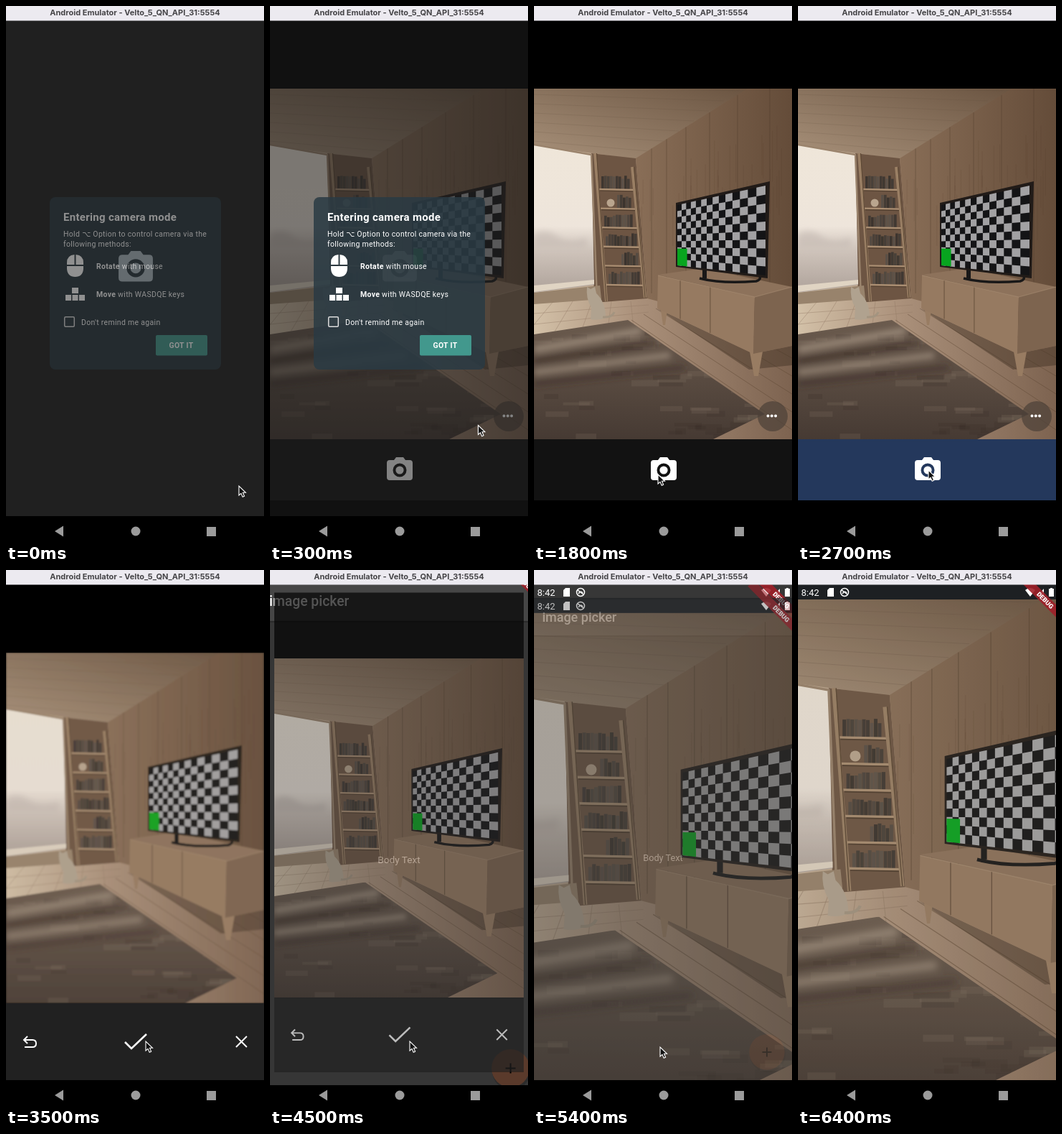
Animation of 360 by 746 pixels, one loop 7.2 s. Source, as an HTML page:

```html
<!DOCTYPE html>
<html>
<head>
<meta charset="utf-8">
<style>
html, body { margin: 0; width: 100%; height: 100%; overflow: hidden; background: #000; }
svg { display: block; width: 360px; height: 746px; }
text { font-family: Roboto, sans-serif; fill: #fff; }
.small { font-size: 10.5px; letter-spacing: .3px; }
.bold { font-weight: 700; }
.title { font: 700 11px Inter, sans-serif; fill: #464548; }
</style>
</head>
<body>
<svg viewBox="0 0 360 746" xmlns="http://www.w3.org/2000/svg">
<defs>
  <linearGradient id="ceil" x1="0" y1="1" x2="1" y2="0">
    <stop stop-color="#a8917a"/><stop offset="1" stop-color="#6a5441"/>
  </linearGradient>
  <linearGradient id="wall">
    <stop stop-color="#896e57"/><stop offset="1" stop-color="#644c39"/>
  </linearGradient>
  <linearGradient id="sky" x2="0" y2="1">
    <stop stop-color="#efe6d9"/><stop offset=".55" stop-color="#eee5db"/>
    <stop offset=".72" stop-color="#cec3ba"/><stop offset=".95" stop-color="#b3a79f"/>
  </linearGradient>
  <linearGradient id="floor">
    <stop stop-color="#d3c1a8"/><stop offset=".4" stop-color="#aa907a"/><stop offset="1" stop-color="#7d6350"/>
  </linearGradient>
  <linearGradient id="rug" x2="0" y2="1">
    <stop stop-color="#6b5b4e"/><stop offset="1" stop-color="#463a33"/>
  </linearGradient>
  <filter id="soft" x="-30%" y="-90%" width="160%" height="280%"><feGaussianBlur stdDeviation="4"/></filter>
  <filter id="blur"><feGaussianBlur id="focus" stdDeviation="1"/></filter>
  <clipPath id="view"><rect y="115" width="360" height="488"/></clipPath>
  <clipPath id="rugClip"><path d="M0 457L131 437L322 568L250 603H0Z"/></clipPath>
  <clipPath id="appClip"><rect y="20" width="360" height="697"/></clipPath>
  <clipPath id="pageClip"><rect y="20" width="360" height="690"/></clipPath>
  <g id="cam">
    <path d="M-14 -13H-8L-5 -17H5L8 -13H14Q18 -13 18 -9V11Q18 15 14 15H-14Q-18 15 -18 11V-9Q-18 -13 -14 -13ZM0 -8.5A9.5 9.5 0 1 0 0 10.5A9.5 9.5 0 1 0 0 -8.5Z" fill="#fff" fill-rule="evenodd"/>
    <circle cy="1" r="5.6" fill="#fff"/>
  </g>
  <g id="status">
    <text x="4.5" y="36" font-size="13">8:42</text>
    <circle cx="65" cy="31" r="5.5" fill="none" stroke="#fff" stroke-width="1.5"/>
    <path d="M61 28L69 34M62 33Q65 28 68 32" fill="none" stroke="#fff" stroke-width="1.5"/>
    <path d="M44 25H50V37H41V28ZM317 28Q324 22 331 28L324 37ZM343 26V36H334ZM350 26H352V25H355V26H357V37H350Z" fill="#fff"/>
    <g transform="translate(345 42) rotate(45)">
      <rect x="-60" y="-6.2" width="120" height="12.4" fill="#9f2029" opacity=".9"/>
      <text y="3.3" font-size="9" font-weight="900" text-anchor="middle">DEBUG</text>
    </g>
  </g>
  <g id="room" clip-path="url(#view)"></g>
</defs>

<rect width="360" height="746"/>
<g fill="#9b9b9b">
  <path d="M68 731L80 723.500V738.500Z"/><circle cx="181" cy="731" r="6.5"/><rect x="280" y="725" width="13" height="13"/>
</g>

<g id="app" clip-path="url(#appClip)"><g id="appBody">
  <rect y="20" width="360" height="690" fill="#363636"/>
  <rect y="20" width="360" height="73" fill="#2b2b2b"/>
  <rect y="20" width="360" height="71" fill="#464646"/>
  <rect y="20" width="360" height="21" fill="#373737"/>
  <text x="11.4" y="72" font-size="18" font-weight="500">image picker</text>
  <text x="180" y="405" font-size="12.7" text-anchor="middle">Body Text</text>
  <circle cx="326" cy="674" r="25" fill="#222" opacity=".5"/>
  <circle cx="325" cy="671" r="24.7" fill="#5a3a2b"/>
  <path d="M318.500 671h13m-6.500 -6.500v13" stroke="#000" stroke-width="1.9"/>
  <use href="#status"/>
</g></g>

<g id="page" clip-path="url(#pageClip)"><g id="pageBody">
  <rect y="20" width="360" height="690" fill="#1d2023"/>
  <use href="#room" transform="translate(-66.800 -116.700) scale(1.371)"/>
  <rect y="41" width="360" height="669" fill="#75685e" opacity=".12"/>
  <use href="#status"/>
</g></g>

<g id="camera">
  <rect y="20" width="360" height="690"/>
  <g clip-path="url(#view)"><g id="photo"><use href="#room"/></g></g>
  <g id="capture">
    <rect y="603" width="360" height="85" fill="#121212"/>
    <rect id="press" y="603" width="360" height="85" fill="#24385c"/>
    <use href="#cam" x="181" y="645"/>
    <circle cx="333" cy="571" r="21" fill="#4c4038" opacity=".7"/>
    <path d="M326.500 570.500h11" stroke="#fff" stroke-width="4" stroke-linecap="round" stroke-dasharray="0 5.3"/>
  </g>
  <g id="review">
    <rect id="haze" y="115" width="360" height="488" fill="#a08878"/>
    <rect y="603" width="360" height="107" fill="#212121"/>
    <g fill="none" stroke="#fff" stroke-width="2">
      <path d="M30 649L25 654L30 659M25 654H37Q42 654 42 659T37 664H26"/>
      <path d="M166 657L175 666L196 646" stroke-width="2.6"/>
      <path d="M321 649L336 664M336 649L321 664"/>
    </g>
  </g>
  <g id="cover">
    <rect y="20" width="360" height="690" fill="#202020"/>
    <use href="#cam" transform="translate(181 363.500) scale(1.330)" opacity=".5"/>
  </g>
</g>

<g id="dialog">
  <rect x="61" y="266" width="239" height="240" rx="8" fill="#2a3a44" opacity=".85"/>
  <text class="bold" x="80" y="299" font-size="15" letter-spacing=".3">Entering camera mode</text>
  <text class="small" x="80" y="321">Hold <tspan font-family="DejaVu Sans, sans-serif">⌥</tspan> Option to control camera via the</text>
  <text class="small" x="80" y="334.5">following methods:</text>
  <path d="M95.500 346V360H85V357Q85 347 95.500 346ZM97.500 346V360H108V357Q108 347 97.500 346ZM85 362H108V366Q107 377 96.500 377T85 366Z" fill="#fff"/>
  <path d="M92 392h9v8h-9zM83 402h8v8h-8zM92.500 402h8v8h-8zM102 402h8v8h-8z" fill="#fff"/>
  <text class="small" x="126" y="365.5"><tspan class="bold">Rotate</tspan> with mouse</text>
  <text class="small" x="126" y="404.5"><tspan class="bold">Move</tspan> with WASDQE keys</text>
  <rect x="81.7" y="432.7" width="13.6" height="13.6" rx="1.5" fill="none" stroke="#ddd" stroke-width="1.5"/>
  <text class="small" x="105" y="443.5">Don't remind me again</text>
  <rect x="209" y="458" width="72" height="28.500" rx="2" fill="#42988d"/>
  <text class="small bold" x="244.5" y="476" text-anchor="middle">GOT IT</text>
</g>

<rect width="360" height="20.5" fill="#eceaf0"/>
<text class="title" x="180" y="12.7" text-anchor="middle">Android Emulator - Velto_5_QN_API_31:5554</text>
<path id="cursor" d="M0 0V13L3 10.300L5.200 15.200L7.600 14.200L5.500 9.300H9.500Z" fill="#111" stroke="#fff" stroke-width="1.1"/>
</svg>
<script>
const $ = id => document.getElementById(id);
const ramp = (t, a, b) => Math.max(0, Math.min(1, (t - a) / (b - a)));
const mix = (a, b, p) => a + (b - a) * p;
const show = (id, o) => { $(id).setAttribute('opacity', o); $(id).style.display = o > 0 ? '' : 'none'; };
const move = (id, value) => $(id).setAttribute('transform', value);

let seed = 7;
const rnd = () => (seed = (seed * 16807) % 2147483647) / 2147483647;
const fill = (color, d, o = 1) => `<path d="${d}" fill="${color}" opacity="${o}"/>`;
const line = (color, w, d, o = 1) => `<path d="${d}" fill="none" stroke="${color}" stroke-width="${w}" opacity="${o}"/>`;
const loop = (n, f) => Array.from({ length: n }, (_, i) => f(i)).join('');

function shell() {
  return fill('url(#floor)', 'M0 115H360V603H0Z') +
    fill('url(#ceil)', 'M0 115H300L142 213L0 194Z') +
    loop(7, i => line('#5e4a3a', .7, `M0 ${188 - i * 13}L${160 + i * 21} ${202 - i * 14}`, .25)) +
    fill('#6d5543', 'M80 205L142 212L158 407L84 413Z') +
    fill('url(#wall)', 'M142 212L298 115H360V460L158 407Z') +
    loop(6, i => {
      const x = 164 + 18 * i + 3 * i * i;
      return line('#463425', .8, `M${x} ${Math.max(115, 212 - (x - 142) * .62)}V400`, .45);
    }) +
    loop(40, () => {
      const x = mix(150, 358, rnd());
      return line('#4a3727', 1, `M${x} ${mix(220, 320, rnd()) - (x - 142) * .3}v${mix(30, 80, rnd())}`, .12);
    }) +
    fill('url(#sky)', 'M0 193L80 207L84 388L0 399Z') +
    `<g filter="url(#soft)">${fill('#c3b8b1', 'M0 336V318Q16 308 32 320T74 322V336Z', .6)}</g>` +
    fill('#e0d4c3', 'M0 389L84 381V387L0 398Z') +
    fill('#98836c', 'M0 399L92 389L94 408L0 415Z') +
    line('#9a836c', 2.5, 'M0 193L80 207L88 408');
}

function ground() {
  const boards = loop(6, i => line('#8e7762', .8, `M${i * 27} 411L${i * 38 - 50} 458`, .5)) +
    loop(2, i => line('#8e7762', .8, `M0 ${428 + i * 15}L160 ${416 + i * 10}`, .5)) +
    loop(5, i => line('#59432f', .9, `M${136 + i * 17} ${437 - i * 8}L360 ${590 - i * 25}`, .5));
  // woven patches under a few blurred sun streaks
  const patches = loop(60, i => `<rect x="${rnd() * 310}" y="${mix(445, 600, rnd())}" width="${mix(14, 40, rnd())}" height="${mix(4, 9, rnd())}" fill="${i % 2 ? '#8a7969' : '#332a25'}" opacity=".18"/>`);
  const streaks = loop(4, i => line(i % 2 ? '#3b302a' : '#b5a391', 10 - i, `M0 ${478 + i * 16}L${150 + i * 20} ${452 + i * 17}`, .6));
  return boards +
    `<g clip-path="url(#rugClip)"><rect y="437" width="360" height="166" fill="url(#rug)"/>${patches}<g filter="url(#soft)">${streaks}</g></g>`;
}

function ladder() {
  const shelves = loop(6, i => {
    const y = 255 + 26.6 * i, a = 92 + 2 * i, b = 140 + 2.7 * i;
    const from = i == 1 || i == 4 ? 20 : 0;
    const books = loop(Math.floor((b - a - from - 6) / 4), k => {
      const h = mix(14, 19, rnd()), tone = mix(58, 94, rnd());
      return `<rect x="${a + from + 2 + k * 4}" y="${y - h}" width="3.6" height="${h}" fill="rgb(${tone},${tone * .88},${tone * .78})"/>`;
    });
    return books + line('#aa8e72', 2.4, `M${a - 3} ${y}L${b} ${y + 1}`) + line('#443426', 1.2, `M${a} ${y + 2}L${b} ${y + 3}`, .7);
  });
  const rail = (x, y, end) => line('#9a7f64', 4, `M${x} ${y}L${end}`) + line('#594532', 1, `M${x + 2.5} ${y}L${end}`);
  return shelves + '<circle cx="107" cy="274" r="5.5" fill="#b9a58e"/>' + rail(85, 205, '101 411') + rail(137, 224, '155 406');
}

function cabinet() {
  const leg = (x, y, w, h) => fill('#987c62', `M${x} ${y}h${w}l${-w / 3} ${h}h${-w / 3}Z`);
  const seam = p => line('#55402f', .9, `M${mix(173, 308, p)} ${mix(375, 405, p)}V${mix(421, 484, p)}`, .8);
  return fill('#3f2f23', 'M172 421L306 484L360 473V500L300 506Z', .45) +
    leg(177, 423, 9, 21) + leg(301, 481, 18, 34) +
    fill('#8d725b', 'M173 374L236 365L360 391L308 405Z') +
    fill('#967a61', 'M173 375L308 405L306 484L172 421Z') +
    fill('#7d644f', 'M308 405L360 391V473L306 484Z') +
    seam(.23) + seam(.54) + line('#b0947a', 1, 'M173 375L308 405L360 391', .6) +
    line('#191818', 6, 'M238 366V379') + line('#191818', 3.5, 'M231 379Q262 387 310 383Q317 381 315 376');
}

function tv() {
  const cols = 14, rows = 10, depth = 1.5;
  const at = (c, r) => {
    const u = c / cols, s = u / ((1 - u) * depth + u), v = r / rows;
    return [mix(200, 323, s), mix(mix(277, 250, s), mix(361, 375, s), v)].map(n => n.toFixed(1)).join(' ');
  };
  const cell = (color, c, r, w = 1, h = 1) => fill(color, `M${at(c, r)}L${at(c + w, r)}L${at(c + w, r + h)}L${at(c, r + h)}Z`);
  return fill('#211b18', 'M198 274L329 244L326 379L198 363Z') + cell('#141416', 0, 0, cols, rows) +
    loop(cols * rows, i => {
      const c = i % cols, r = Math.floor(i / cols);
      return (c + r) % 2 ? cell('#a2a1a3', c, r) : '';
    }) + cell('#08a51f', 0, 7.2, 2.2, 2.8);
}

const cat = () => fill('#b0a28f', 'M74 391L79 394L85 391L87 400Q100 412 100 434Q90 438 79 436L80 420Q72 406 74 391Z') +
  line('#a39480', 3, 'M96 433Q109 434 112 426');

$('room').innerHTML = shell() + ground() + ladder() + cabinet() + tv() + cat();

// pointer moves: from, to, x, y
const moves = [[100, 800, 242, 465], [1100, 1600, 173, 652], [2000, 2300, 182, 646],
  [2800, 3500, 195, 656], [4500, 4800, 176, 664], [5800, 6400, 178, 750]];

function pointer(t) {
  return moves.reduce(([x, y], [a, b, nx, ny]) => {
    const p = 1 - (1 - ramp(t, a, b)) ** 1.6;
    return [mix(x, nx, p), mix(y, ny, p)];
  }, [325, 668]);
}

function draw(t) {
  show('cover', 1 - ramp(t, 80, 570));
  show('dialog', mix(.5, 1, ramp(t, 0, 250)) * (1 - ramp(t, 820, 1150)));
  show('press', ramp(t, 1900, 2300));
  show('capture', t < 3100 ? 1 : 0);
  show('review', ramp(t, 2700, 3100));

  const unsharp = ramp(t, 2700, 3100) * (1 - ramp(t, 3500, 4000));
  show('haze', .1 * unsharp);
  $('focus').setAttribute('stdDeviation', unsharp);
  $('photo').setAttribute('filter', unsharp ? 'url(#blur)' : 'none');

  const gone = ramp(t, 4400, 4700);
  show('camera', 1 - gone);
  move('camera', `translate(${18 * gone} ${36.5 * gone}) scale(${1 - .1 * gone})`);
  show('app', t >= 4500 ? 1 : 0);
  move('appBody', `translate(180 365) scale(${1 + .1 * (1 - ramp(t, 4400, 5100)) ** 2}) translate(-180 -365)`);

  const p = ramp(t, 5200, 5500);
  show('page', p);
  move('pageBody', `translate(0 ${170 * (1 - p) ** 2})`);
  move('cursor', `translate(${pointer(t)})`);
}

const start = performance.now();
function tick() {
  const t = (performance.now() - start) % 7200;
  draw(Math.floor(t / 100) * 100);
  requestAnimationFrame(tick);
}
tick();
</script>
</body>
</html>
```
